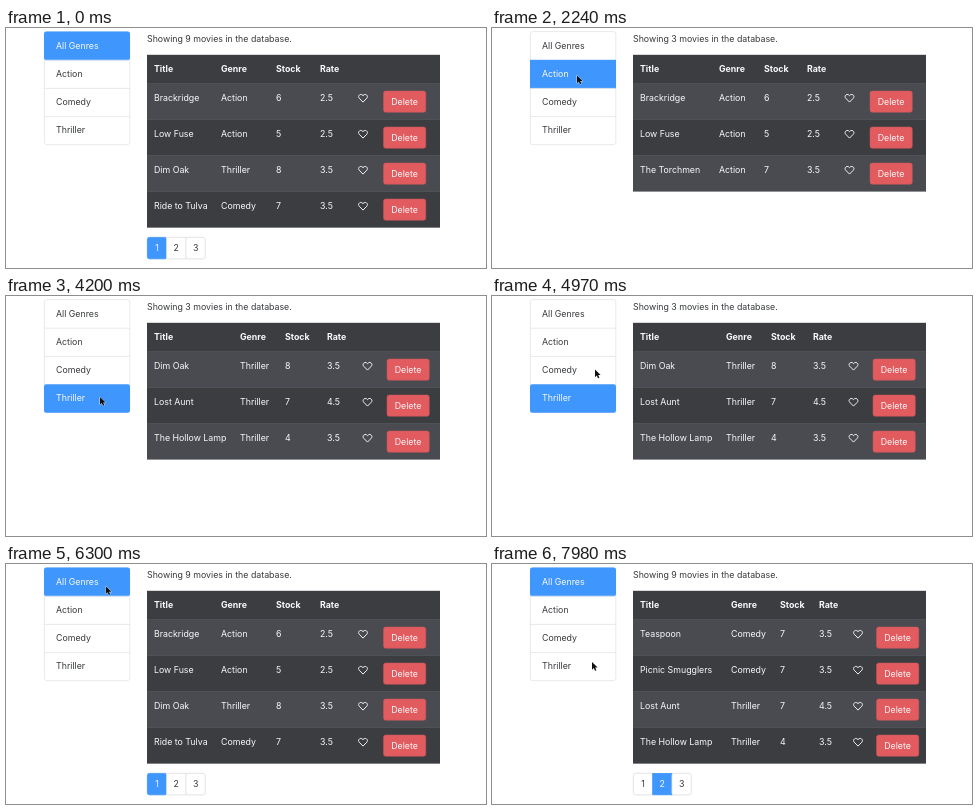
Recreate the animation shown at these times as an HTML page. Size 480 by 240 pixels, loop 8 s.

```html
<!DOCTYPE html>
<html lang="en">
<head>
<meta charset="utf-8">
<title>Movie list</title>
<style>
  html, body { margin: 0; width: 100%; height: 100%; overflow: hidden; background: #fff; }
  svg { display: block; width: 480px; height: 240px; }
  text { font: 8.8px Inter, Roboto, sans-serif; fill: #36393c; white-space: pre; }
  .light { fill: #f8f9fa; }
  .bold { font-weight: 700; }
  .mid { text-anchor: middle; }
  .box { fill: #fff; stroke: #e3e4e6; stroke-width: .8; }
  .on { fill: #3f97fd; }
  .hover { fill: #e9ecef; }
  .head, .even { fill: #3b3d41; }
  .odd { fill: #494b50; }
  .rule { stroke: #424549; stroke-width: .7; }
  .delete { fill: #e15b5f; stroke: #c9555a; stroke-width: .5; }
  .heart { fill: none; stroke: #f8f9fa; stroke-width: .95; stroke-linejoin: round; }
  #arrow { fill: #111; stroke: #fff; stroke-width: .7; paint-order: stroke; }
  #hand { fill: #fff; stroke: #222; stroke-width: .8; stroke-linejoin: round; }
</style>
</head>
<body>
<svg viewBox="0 0 480 240">
  <g id="page"></g>
  <path id="arrow" d="M0 0V7.7L1.8 6.1 3 8.8 4.4 8.2 3.2 5.6H5.6Z"/>
  <path id="hand" d="M-.8 4.8V.2Q0-.9.8.2V3.2L2.2 3.1 3.6 3.5 5 4.1V6.6L4 9H-.8L-3.2 5.9Q-3.4 4.3-2 4.8L-.8 6Z"/>
</svg>
<script>
const LOOP = 8000, STEP = 70;
const genres = ['All Genres', 'Action', 'Comedy', 'Thriller'];
const movies = [
  ['Brackridge', 'Action', 6, 2.5],
  ['Low Fuse', 'Action', 5, 2.5],
  ['Dim Oak', 'Thriller', 8, 3.5],
  ['Ride to Tulva', 'Comedy', 7, 3.5],
  ['Teaspoon', 'Comedy', 7, 3.5],
  ['Picnic Smugglers', 'Comedy', 7, 3.5],
  ['Lost Aunt', 'Thriller', 7, 4.5],
  ['The Hollow Lamp', 'Thriller', 4, 3.5],
  ['The Torchmen', 'Action', 7, 3.5]
];

// Column positions: four texts, heart centre, button edge
const narrow = [148, 215, 270, 314, 357, 377.5];
const action = [148, 227, 272, 315, 357.5, 378];
const wide = [148, 239, 288, 327, 366, 384.5];
const thriller = [148, 234, 279, 321, 361.5, 381];

// start time, genre index, page, columns
const views = [
  [0, 0, 1, narrow],
  [2170, 1, 0, action],
  [3010, 2, 0, wide],
  [4060, 3, 0, thriller],
  [5460, 1, 0, action],
  [6020, 0, 1, narrow],
  [7210, 0, 2, wide]
];

// time, x, y of the pointer
const path = [
  [350, 193, 185], [560, 193, 185], [1330, 96, 54], [1650, 78, 50],
  [2029, 78, 50], [2030, 85, 47.5], [2550, 85, 47.5], [2800, 84, 76],
  [3570, 84, 76], [3710, 92.5, 100], [3800, 94, 101], [4550, 94, 101],
  [4970, 103, 73.5], [5250, 101, 46], [5600, 101, 46], [5810, 99, 24],
  [6260, 99, 20], [6900, 171, 215], [7200, 171, 215], [7770, 164, 214],
  [7980, 100, 98]
];

const page = document.getElementById('page');
const arrow = document.getElementById('arrow');
const hand = document.getElementById('hand');

const text = (x, mid, s, cls = '') =>
  `<text x="${x}" y="${mid + 3.2}" class="${cls}">${s}</text>`;
const rect = (x, y, w, h, cls, r = 0) =>
  `<rect x="${x}" y="${y}" width="${w}" height="${h}" rx="${r}" class="${cls}"/>`;
const line = (x1, x2, y) => `<path class="rule" d="M${x1} ${y}H${x2}"/>`;

function sidebar(active) {
  return rect(38.4, 3.6, 85.4, 113, 'box', 2.5) + genres.map((name, i) => {
    const y = 4 + 28.2 * i, on = i === active;
    const row = on ? rect(38, y - .4, 86, 28.6, 'on', i % 3 ? 0 : 2.2)
      : i ? `<path class="box" d="M38.4 ${y}H123.8"/>` : '';
    return row + text(50, 18 + 28 * i, name, on ? 'light' : '');
  }).join('');
}

function table(rows, cols) {
  const [heartX, buttonX] = cols.slice(4);
  const head = rect(141, 26.8, 293, 28.8, 'head') +
    ['Title', 'Genre', 'Stock', 'Rate'].map((s, i) => text(cols[i], 41, s, 'light bold')).join('');
  return head + rows.map((movie, i) => {
    const y = 55.4 + 36.05 * i, mid = 70 + 36 * i;
    return rect(141, y, 293, 36.1, i % 2 ? 'even' : 'odd') + line(141, 434, y) +
      movie.map((s, c) => text(cols[c], mid, Number.isFinite(s) && c === 3 ? s.toFixed(1) : s, 'light')).join('') +
      `<path class="heart" transform="translate(${heartX} ${mid})" d="M0 4.1L-3.8.2C-5.9-2.2-2.3-5.3 0-2.4C2.3-5.3 5.9-2.2 3.8.2Z"/>` +
      rect(buttonX, mid - 7, 42.3, 21.3, 'delete', 2.2) +
      text(buttonX + 21.1, mid + 3.8, 'Delete', 'light mid');
  }).join('');
}

function pager(current, hovered) {
  return rect(141.4, 209.4, 57.8, 21.4, 'box', 2.2) + [1, 2, 3].map(n => {
    const x = 141 + 19.3 * (n - 1), on = n === current;
    const cls = on ? 'box on' : n === hovered ? 'box hover' : 'box';
    const style = on ? ' style="fill:#3f97fd;stroke:#3f97fd"' : n === hovered ? ' style="fill:#e9ecef"' : '';
    return `<rect x="${x + .4}" y="209.4" width="19.2" height="21.4" rx="${n === 2 ? 0 : 2}" class="${cls}"${style}/>` +
      text(x + 10, 220, n, on ? 'light mid' : 'mid');
  }).join('');
}

function draw([, genre, current, cols], hovered) {
  const found = genre ? movies.filter(m => m[1] === genres[genre]) : movies;
  const rows = current ? found.slice(4 * current - 4, 4 * current) : found;
  page.innerHTML = sidebar(genre) +
    text(141, 10.8, `Showing ${found.length} movies in the database.`) +
    table(rows, cols) + (current ? pager(current, hovered) : '');
}

function pointerAt(t) {
  const next = path.findIndex(p => p[0] > t);
  if (next < 0) return path[path.length - 1].slice(1);
  if (!next) return null;
  const [t0, x0, y0] = path[next - 1], [t1, x1, y1] = path[next];
  const k = (t - t0) / (t1 - t0), e = k * k * (3 - 2 * k);
  return [x0 + (x1 - x0) * e, y0 + (y1 - y0) * e];
}

let shown = '';
function frame() {
  const t = Math.floor(performance.now() % LOOP / STEP) * STEP;
  const view = views.filter(v => v[0] <= t).pop();
  const pos = pointerAt(t);
  const onPager = pos && view[2] > 0 && pos[0] > 141 && pos[0] < 199 && pos[1] > 209;
  const hovered = onPager ? Math.ceil((pos[0] - 141) / 19.3) : 0;
  const key = view[0] + ':' + hovered;
  if (key !== shown) {
    draw(view, hovered);
    shown = key;
  }
  arrow.style.display = pos && !onPager ? '' : 'none';
  hand.style.display = onPager ? '' : 'none';
  if (pos) (onPager ? hand : arrow).setAttribute('transform', `translate(${pos})`);
  requestAnimationFrame(frame);
}
frame();
</script>
</body>
</html>
```
